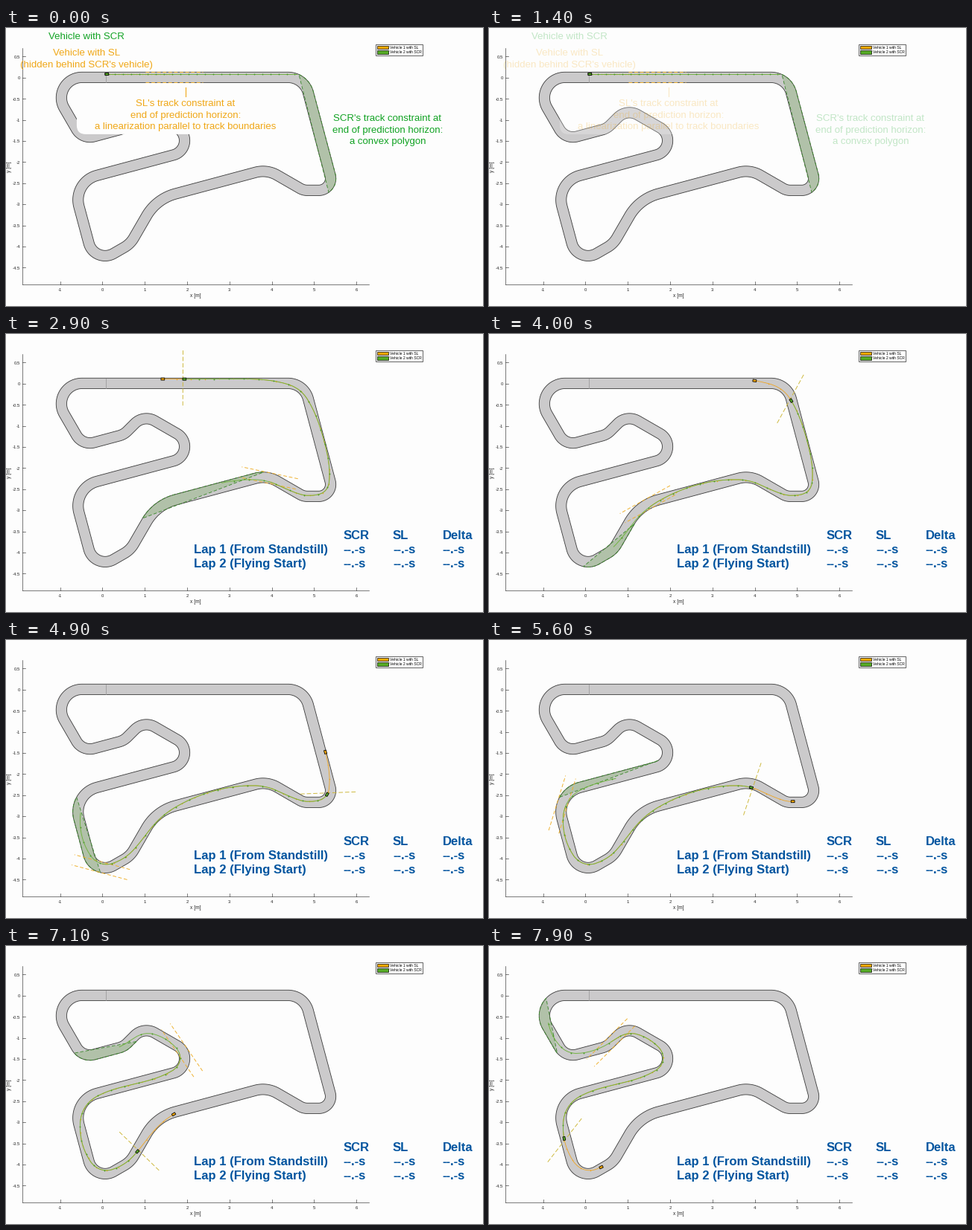
These frames come from a looping animation (640x374 px, 8 s). A matplotlib script:

```python
import numpy as np
import matplotlib.pyplot as plt
from matplotlib.animation import FuncAnimation
from matplotlib.patches import FancyBboxPatch, Polygon, Rectangle

W, H, DPI = 640, 374, 100
FRAMES, STEP = 80, 100
PX = 72 / DPI
SCALE, X0, Y0 = 56.8, 130, 67.5
HALF = 7.1          # half the track width
REACH = 38.5        # half the length of a constraint line
START, HORIZON = 1.5, 3.2
NUDGE = 0.6
BG, GREY, INK, EDGE = "#fdfdfd", "#cbcacb", "#262626", "#3a3a3a"
ORANGE, GREEN, BLUE = "#f6a800", "#57ab27", "#00549f"
NOTE_ORANGE, NOTE_GREEN = "#f0a818", "#12a324"

plt.rcParams["font.family"] = "Liberation Sans"
fig = plt.figure(figsize=(W / DPI, H / DPI), dpi=DPI, facecolor=BG)
ax = fig.add_axes([0, 0, 1, 1])
ax.set(xlim=(NUDGE, W + NUDGE), ylim=(H + NUDGE, NUDGE))
ax.axis("off")


def unit(v):
    return v / np.hypot(*v)


def ramp(t, start, length):
    return np.clip((t - start) / length, 0, 1)


def rounded(corners):
    """Closed polygon whose corners (x, y, radius) become arcs, in one-pixel steps."""
    out = []
    xy = np.array([c[:2] for c in corners], float)
    for i, (_, _, r) in enumerate(corners):
        v = xy[i]
        u = unit(xy[i - 1] - v)
        w = unit(xy[(i + 1) % len(xy)] - v)
        half = np.arccos(u @ w) / 2
        mid = v + unit(u + w) * r / np.sin(half)
        p, q = (v + k * r / np.tan(half) - mid for k in (u, w))
        turn = np.arctan2(p[0] * q[1] - p[1] * q[0], p @ q)
        ang = np.arctan2(p[1], p[0]) + np.linspace(0, 1, 40) * turn
        out.append(mid + r * np.c_[np.cos(ang), np.sin(ang)])
    out = np.vstack(out + [out[0][:1]])
    d = np.r_[0, np.cumsum(np.hypot(*np.diff(out, axis=0).T))]
    s = np.arange(0, d[-1], d[-1] / int(d[-1]))
    return np.c_[np.interp(s, d, out[:, 0]), np.interp(s, d, out[:, 1])]


def nearest(pt):
    return int(np.argmin(np.hypot(*(center - pt).T)))


def racing_line(limit=6.0, lean=-2.0, pull=1e-4, stiff=10.0):
    """Line of least curvature that stays within `limit` of the center line."""
    size = len(center)
    idx = np.arange(0, size - 3, 6)
    c, n = center[idx], normal[idx]
    eye = np.eye(len(idx))
    bend = np.roll(eye, 1, axis=0) + np.roll(eye, -1, axis=0) - 2 * eye
    K, g = pull * eye, np.full(len(idx), -pull * lean)
    for k in (0, 1):
        B = bend * n[:, k]
        K = K + B.T @ B
        g = g + B.T @ (bend @ c[:, k])
    off = np.zeros(len(idx))
    for _ in range(25):
        hit = stiff * (np.abs(off) > limit)
        off = np.linalg.solve(K + np.diag(hit), hit * limit * np.sign(off) - g)
    off = np.interp(np.arange(size), idx, off, period=size)
    return center + np.clip(off, -limit, limit)[:, None] * normal


def mover(pts):
    """Distance over time: at rest until START, then smooth through timed points."""
    t = np.array([START, 2.9, 4.0, 4.9, 6.3, 7.9, 9.5, 11.1])
    s = np.array([nearest(p) for p in pts], float)
    m = np.gradient(s, t)
    m[0] = 0

    def at(now):
        now = np.clip(now, t[0], t[-1])
        i = min(np.searchsorted(t, now, "right") - 1, len(t) - 2)
        h = t[i + 1] - t[i]
        u = (now - t[i]) / h
        return ((1 + 2 * u) * (1 - u) ** 2 * s[i] + u * (1 - u) ** 2 * h * m[i]
                + u * u * (3 - 2 * u) * s[i + 1] + u * u * (u - 1) * h * m[i + 1])
    return at


def convex_area(i0):
    """Longest stretch of one border whose chord stays on the track."""
    best, area = 0, None
    u = np.linspace(0, 1, 30)[:, None]
    for border in sides:
        for n in range(3, 280, 3):
            j = i0 + n
            chord = border[i0] * (1 - u) + border[j] * u
            near = loop[max(i0 - 20, 0):j + 20:2]
            gap = np.hypot(*(chord[:, None] - near).transpose(2, 0, 1)).min(axis=1)
            if gap.max() > HALF + 0.8:
                break
            if n > best:
                best, area = n, border[i0:j + 1]
    return best, area


# Track geometry
center = rounded([
    (400.5, 67, 28), (441, 219, 16), (399.7, 219, 20), (350.7, 190.7, 38),
    (202.4, 230.5, 64), (167.4, 291, 35), (119.4, 318.7, 22.6),
    (89.7, 207.8, 34), (272, 158.9, 20), (185.5, 109, 22),
    (158.7, 135.8, 25), (103.2, 150.7, 21), (54.8, 67, 27.5)])
center = np.roll(center, -nearest((136, 67)), axis=0)
tangent = np.roll(center, -1, axis=0) - np.roll(center, 1, axis=0)
tangent /= np.hypot(*tangent.T)[:, None]
normal = np.c_[-tangent[:, 1], tangent[:, 0]]
inner, outer = center + HALF * normal, center - HALF * normal
loop = np.vstack([center, center])
sides = [np.vstack([b, b]) for b in (inner, outer)]
race = racing_line()

# Convex areas laid end to end round the track
areas = []
s = nearest((392, 67))
while s < len(center):
    length, shape = convex_area(s)
    areas.append((s, shape))
    s += length

scr_pos = mover([(136, 67), (240, 67), (404, 91), (428, 207),
                 (263, 208), (97, 261), (238, 141), (75, 105)])
sl_pos = mover([(136, 67), (211, 67), (357, 67), (430, 151),
                (328, 197), (150, 296), (176, 184), (163, 130)])


def horizon(pos, rest, t):
    """Predicted end: a fixed reach at standstill, later the place HORIZON ahead."""
    k = ramp(t, START, 0.6)
    return int((1 - k) * rest + k * pos(t + HORIZON))


def line(xs, ys, color, width=0.8, z=3, **kw):
    return ax.plot(xs, ys, color=color, lw=width * PX, zorder=z, **kw)[0]


def label(x, y, s, size, color=INK, ha="center", va="baseline", z=9, **kw):
    return ax.text(x, y, s, fontsize=size * PX, color=color, ha=ha, va=va, zorder=z, **kw)


# Track
for border, fill in ((outer, GREY), (inner, BG)):
    ax.add_patch(Polygon(border, fc=fill, ec=EDGE, lw=0.85 * PX, zorder=1))
line([135, 135], [60.5, 74], "#9a9a9a", 0.8, 2)

# Axes
line([22.5, 22.5], [28, 346], INK, 0.6)
line([22.5, 488], [346, 346], INK, 0.6)
for v in range(-1, 7):
    x = X0 + SCALE * v
    line([x, x], [346, 341.5], INK, 0.6)
    label(x, 355, str(v), 6)
for k in range(-9, 2):
    y = Y0 - SCALE * k / 2
    line([22.5, 27], [y, y], INK, 0.6)
    label(20, y + 2.2, f"{k / 2:g}", 6, ha="right")
label(255, 362.5, "x [m]", 6.6)
label(5.5, 187, "y [m]", 6.6, va="center", rotation=90)

# Legend
ax.add_patch(Rectangle((496.2, 22.2), 63, 15, fc="white", ec=INK, lw=0.7 * PX, zorder=8))
for y, color, name in ((26.7, ORANGE, "Vehicle 1 with SL"), (33.2, GREEN, "Vehicle 2 with SCR")):
    ax.add_patch(Rectangle((498.2, y - 2.2), 15.5, 4.4, fc=color, ec="black",
                           lw=0.7 * PX, zorder=9))
    label(515.2, y + 1.9, name, 5, "black", "left")

# Opening notes
notes = [ax.add_patch(FancyBboxPatch((107.5, 104), 266, 27.5, fc=BG, ec="none", zorder=7,
                                     boxstyle="round,pad=12,rounding_size=12")),
         line([241.5, 241.5], [81, 92.5], NOTE_ORANGE, 1.1, 9)]
for x, y, color, text in (
        (108.7, 15.6, NOTE_GREEN, "Vehicle with SCR"),
        (109, 37.8, NOTE_ORANGE, "Vehicle with SL\n(hidden behind SCR's vehicle)"),
        (241.5, 106, NOTE_ORANGE, "SL's track constraint at\nend of prediction horizon:\n"
                                  "a linearization parallel to track boundaries"),
        (512.5, 126.1, NOTE_GREEN, "SCR's track constraint at\nend of prediction horizon:\n"
                                   "a convex polygon")):
    for i, row in enumerate(text.split("\n")):
        notes.append(label(x, y + 15.4 * i, row, 13.3, color))

# Lap table
table = []
blank = ["--.-s"] * 3
for i, row in enumerate((["", "SCR", "SL", "Delta"],
                         ["Lap 1 (From Standstill)"] + blank,
                         ["Lap 2 (Flying Start)"] + blank)):
    for x, s in zip((253, 453, 519.5, 586), row):
        table.append(label(x, 276.5 + 19 * i, s, 16.6, BLUE, "left", weight="bold"))

# Moving parts
stub = [(0, 0), (1, 1), (1, 0)]
area = ax.add_patch(Polygon(stub, fc=(0.4, 0.66, 0.27, 0.25), ec="#3f8a30",
                            lw=0.9 * PX, ls=(0, (5, 3)), zorder=3))
bounds = [line([], [], "#efb02c", 0.95, 4, dashes=(5, 3)) for _ in range(2)]
avoid = line([], [], "#cdb83a", 0.95, 4, dashes=(6, 3))
sl_path = line([], [], "#f0a41c", 0.8, 4, marker="o", ms=1.5 * PX, mew=0)
scr_path = line([], [], "#6fb33c", 0.9, 5, marker="o", ms=1.9 * PX, mew=0, mfc="#4c9a2a")
cars = [ax.add_patch(Polygon(stub, fc=c, ec="black", lw=0.8 * PX, zorder=6))
        for c in (ORANGE, GREEN)]


def on_race(s):
    k = np.arange(len(race))
    return np.array([np.interp(s, k, race[:, i]) for i in (0, 1)])


def place_car(car, s):
    p = on_race(s)
    d = unit(on_race(s + 3) - on_race(max(s - 3, 0)))
    n = np.array([-d[1], d[0]])
    car.set_xy([p + a * 2.4 * d + b * 1.5 * n for a, b in ((1, 1), (1, -1), (-1, -1), (-1, 1))])
    return p


def draw_path(art, s0, s1, blend):
    """The prediction is a straight line until the vehicles move."""
    x, y = race[int(s0):s1].T
    art.set_data(x, y[0] + blend * (y - y[0]))
    art.set_markevery(max(len(x) // 22, 1))


def draw_bar(art, mid, d):
    art.set_data(*np.array([mid - REACH * d, mid + REACH * d]).T)


def update(frame):
    t = frame * STEP / 1000
    for n in notes:
        n.set_alpha(1 - ramp(t, 0.92, 0.64))
    for cell in table:
        cell.set_alpha(ramp(t, 1.5, 0.5))

    a, b = sl_pos(t), scr_pos(t)
    sl_end, scr_end = horizon(sl_pos, 90, t), horizon(scr_pos, 258, t)
    blend = ramp(t, START, 0.2)
    draw_path(sl_path, a, sl_end, blend)
    draw_path(scr_path, b, scr_end, blend)
    sl, scr = place_car(cars[0], a), place_car(cars[1], b)

    for art, side in zip(bounds, (HALF, -HALF)):
        draw_bar(art, center[sl_end] + side * normal[sl_end], tangent[sl_end])

    # Separating line, square to the line between the vehicles
    gap = np.hypot(*(scr - sl))
    avoid.set_visible(gap > 2)
    if gap > 2:
        d = (scr - sl) / gap
        draw_bar(avoid, scr - 2 * d, np.array([-d[1], d[0]]))

    current = [shape for s0, shape in areas if s0 <= scr_end + 4]
    area.set_xy(current[-1])
    return []


anim = FuncAnimation(fig, update, frames=FRAMES, interval=STEP, repeat=True,
                     repeat_delay=0, init_func=lambda: [], blit=False)
plt.show()
```
